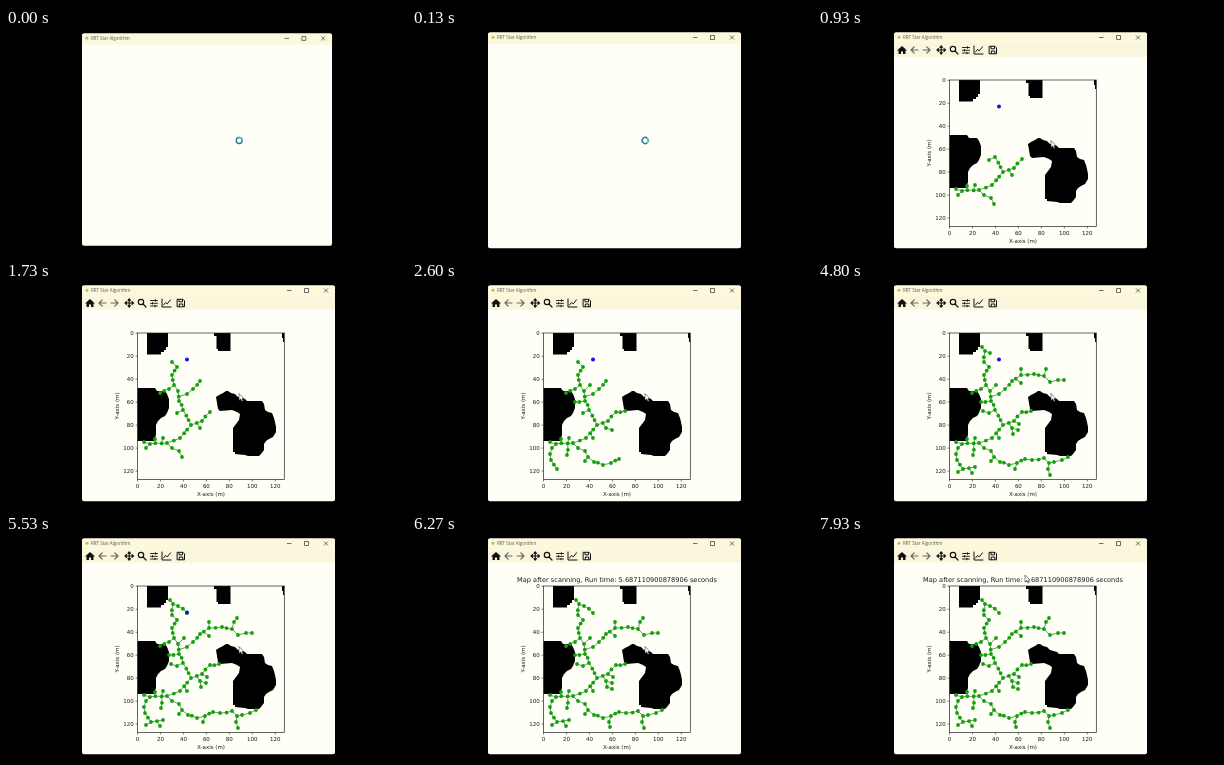
Recreate the animation shown at these times as an HTML page. Size 400 by 225 pixels, loop 8 s.

```html
<!DOCTYPE html>
<html lang="en">
<head>
<meta charset="utf-8">
<title>RRT Star Algorithm</title>
<style>
html, body { margin: 0; width: 100%; height: 100%; overflow: hidden; background: #000; }
svg { display: block; width: 100vw; height: 100vh; }
.ui { font: 4.5px "Open Sans", sans-serif; fill: #555; }
.plot text { font: 5.5px "DejaVu Sans", sans-serif; fill: #1a1a1a; text-anchor: middle; }
.plot #title { font-size: 6.6px; }
.plot .y { text-anchor: end; }
.line { fill: none; stroke: #111; stroke-width: 1.2; stroke-linecap: round; stroke-linejoin: round; }
.dim { stroke: #666; }
</style>
</head>
<body>
<svg id="stage" viewBox="0 0 400 225">
  <rect width="400" height="225" fill="#000"/>
  <g id="win">
    <rect x="76" y="4.5" width="253" height="215.7" rx="2" fill="#fffff8"/>
    <path d="M76 16V6.500q0-2 2-2H327q2 0 2 2V16z" fill="#fcf8dc"/>
    <circle cx="81" cy="9.300" r="1.500" fill="#c9b569"/>
    <text class="ui" x="85" y="11">RRT Star Algorithm</text>
    <path d="M281 9.500h4.500M298.500 7.500h4v4h-4zM318 7.500l4 4m0-4l-4 4" fill="none" stroke="#333" stroke-width=".7"/>
  </g>
  <g id="app">
    <rect x="76" y="16" width="253" height="12.700" fill="#faf6dc"/>
    <g id="tools">
      <path d="M79 22.500L84 18l5 4.500h-1.500V26H85v-2.500h-2V26h-2.500v-3.500z" fill="#111"/>
      <path class="line dim" stroke-width="1.600" d="M100 22H93m3.200-3.200L93 22l3.200 3.200M105 22h7m-3.200-3.200L112 22l-3.200 3.200"/>
      <path class="line" d="M119.500 22h7.500M123.200 18.200v7.600M120.500 20.700L119 22l1.500 1.300M126 20.700l1.500 1.300-1.500 1.300M122 19.300l1.200-1.500 1.200 1.500M122 24.700l1.200 1.500 1.200-1.500"/>
      <circle class="line" cx="135" cy="21" r="2.700"/>
      <path class="line" d="M137 23l3 3"/>
      <path class="line" style="stroke-width:.9" d="M144.500 19.500h7M144.500 22.300h7M144.500 25h7M149.500 18.700v1.600M146.500 21.500v1.600M149 24.200v1.600"/>
      <path class="line" style="stroke-width:1" d="M156 18v8h9M157.500 24l2-2.500 1.800 1.300 3.200-4"/>
      <path class="line" style="stroke-width:1" d="M171.500 18.300h5.500l1.500 1.500v6h-7zM173 18.500v2.300h3.500v-2.300M173.300 25.500v-2.500h3.500v2.500"/>
    </g>
    <g class="plot">
      <g id="walls">
        <path d="M141 52h21v14h-2v3h-2v2h-3v2.500h-14z"/>
        <path d="M208 52h16.500v18H212v-2h-1.500v-13H208z"/>
        <path d="M276 52h2.200v9H277v-4h-1z"/>
        <path d="M131.500 107H149l2 3h8l2 3 2 5v9l-2 5-2 3-4 2-3 3-2 4v10l-2 6H131.500z"/>
        <path d="M210 116l3-2 4-2 3-2h2l3 2 4 1 3 3 7 2 2 2h15l2 3 1 6 3 2 4 1 2 5 1 4 1 5v5l-3 5-4 2-3 2-2 3v6l-3 4-2 2h-11l-3-1-10-1v-2h-2v-24l3-4 3-4 1-6-3-2-5-2-12 1-2-2z"/>
      </g>
      <rect x="131.500" y="52" width="146.800" height="146.500" fill="none" stroke="#222" stroke-width=".7"/>
      <g id="axes"></g>
      <text x="205" y="215">X-axis (m)</text>
      <text transform="translate(113.200 125) rotate(-90)">Y-axis (m)</text>
      <g id="edges" stroke="#3c8c2c" stroke-width=".8"></g>
      <g id="nodes" fill="#12a00c"></g>
      <circle id="goal" cx="181" cy="78.500" r="2" fill="#1414d8"/>
      <text id="title" x="205" y="48.200">Map after scanning, Run time: 5.687110900878906 seconds</text>
    </g>
  </g>
  <g id="busy" fill="none" stroke-width="1.400">
    <circle cx="233.200" cy="112.500" r="3" stroke="#1c7f96"/>
    <path d="M233.200 109.500a3 3 0 0 1 3 3" stroke="#6cc4cc"/>
  </g>
  <path id="arrow" d="M0 0v7l1.700-1.500 1.200 2.600 1.200-.6-1.200-2.400H5z" fill="#fff" stroke="#111" stroke-width=".5"/>
</svg>
<script>
const LOOP = 8000, READY = 270, DONE = 5860, STEP = 5.8;
const $ = id => document.getElementById(id);

function add(parent, tag, attrs, text) {
  const el = document.createElementNS(parent.namespaceURI, tag);
  for (const k in attrs) el.setAttribute(k, attrs[k]);
  if (text !== undefined) el.textContent = text;
  return parent.appendChild(el);
}
const show = (el, on) => el.setAttribute("visibility", on ? "visible" : "hidden");
const clamp = v => Math.max(0, Math.min(1, v));

for (let v = 0; v <= 120; v += 20) {
  const x = 131.5 + v * 1.148, y = 52.3 + v * 1.148, axes = $("axes");
  add(axes, "path", { d: `M${x} 198.500v2M131.500 ${y}h-2`, stroke: "#222", "stroke-width": .6 });
  add(axes, "text", { x, y: 206.8 }, v);
  add(axes, "text", { x: 127.7, y: y + 2, class: "y" }, v);
}

// Each phase: end time, then targets the tree grows towards.
const phases = [
  [920, "144,163 161,162 174,157 185,144 196,140 204,131 177,129 171,132 166,167 173,170 176,176 140,167 149,158 157,157 194,147"],
  [2590, "173,120 172,110 168,104 166,94 171,86 166,81 181,113 187,108 194,100 163,108 154,112 163,121 178,104 138,173 139,179 145,188 155,174 173,180 182,181 191,184 199,182 207,178 213,130 200,149 181,157"],
  [3850, "203,94 216,93 226,95 232,101 240,99 167,70 214,179 226,177 231,182 236,181 165,130 140,191 197,188 203,102"],
  [4790, "164,66 172,72 228,88 246,99 203,88 201,143 195,153 157,186 154,192 230,188 232,194 244,179 250,176"],
  [5840, "181,79 231,84 200,155 198,193"]
];

let seed = 7;
const jitter = () => (seed = seed * 16807 % 2147483647) / 2147483647 * 1.6 - .8;

const tree = [{ x: 138, y: 161, t: READY }];
const dist = (a, b) => Math.hypot(a.x - b.x, a.y - b.y);

function extend(target) {
  const from = tree.reduce((a, b) => dist(b, target) < dist(a, target) ? b : a);
  const count = Math.max(1, Math.round(dist(from, target) / STEP));
  let parent = from;
  for (let i = 1; i <= count; i++) {
    const k = i / count, wobble = i < count ? 1 : 0;
    const node = {
      x: from.x + (target.x - from.x) * k + wobble * jitter(),
      y: from.y + (target.y - from.y) * k + wobble * jitter(),
      parent
    };
    tree.push(node);
    parent = node;
  }
}

let begin = READY;
for (const [end, targets] of phases) {
  const first = tree.length;
  for (const p of targets.split(" ")) {
    const [x, y] = p.split(",").map(Number);
    extend({ x, y });
  }
  const count = tree.length - first;
  for (let i = 0; i < count; i++) tree[first + i].t = begin + (end - begin) * (i + 1) / count;
  begin = end;
}

for (const n of tree) {
  n.dot = add($("nodes"), "circle", { cx: n.x, cy: n.y, r: 1.9 });
  if (n.parent) n.edge = add($("edges"), "line", { x1: n.parent.x, y1: n.parent.y, x2: n.x, y2: n.y });
}

function draw(t) {
  const ready = t >= READY;
  const open = 1 - (1 - clamp(t / 130)) ** 3;
  const sx = .988 + .012 * open, sy = .984 + .016 * open;
  $("win").setAttribute("transform", `translate(${76 * (1 - sx)} ${5.5 - open - 4.5 * sy}) scale(${sx} ${sy})`);

  $("app").style.display = ready ? "" : "none";
  $("busy").style.display = ready ? "none" : "";
  $("busy").setAttribute("transform", `rotate(${t * .36} 233.200 112.500)`);

  for (const n of tree) {
    show(n.dot, t >= n.t);
    if (n.edge) show(n.edge, t >= n.t);
  }
  show($("goal"), t < DONE);
  show($("title"), t >= DONE);

  const m = clamp((t - 7250) / 650), e = m * m * (3 - 2 * m);
  show($("arrow"), ready);
  $("arrow").setAttribute("transform", `translate(${233 - 26 * e} ${112.5 - 71.5 * e})`);
}

function tick() {
  draw(performance.now() % LOOP);
  requestAnimationFrame(tick);
}
tick();
</script>
</body>
</html>
```
